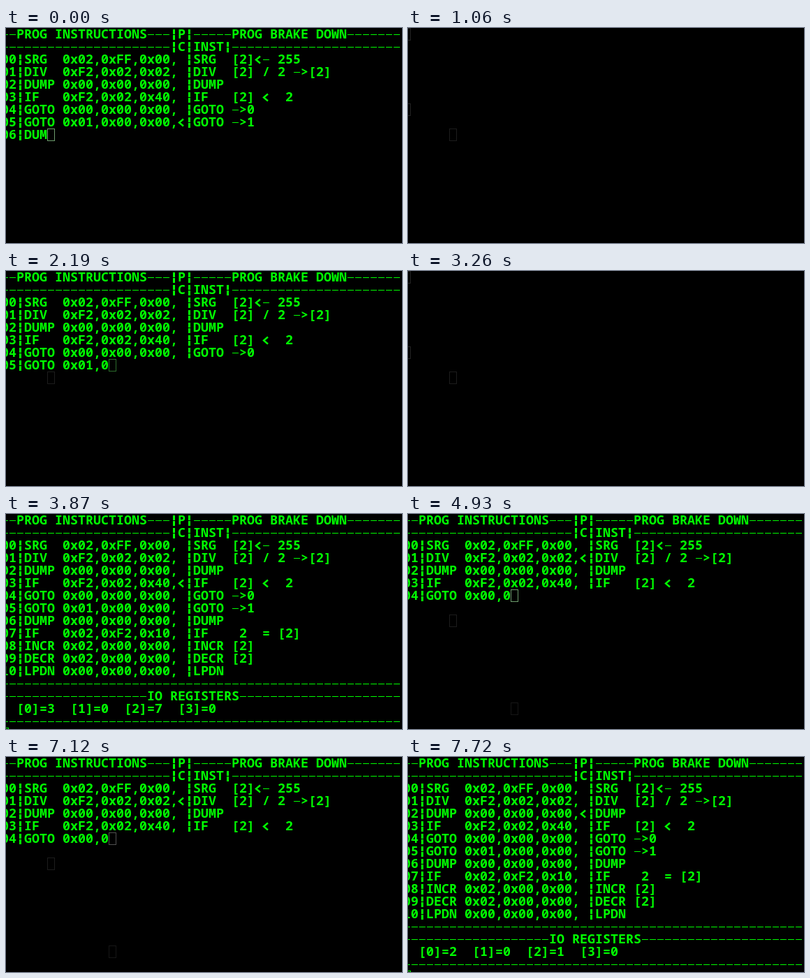
Recreate the animation shown at these times as an HTML page with a canvas. Size 567x308 px, loop 8000 ms.

```html
<!DOCTYPE html>
<html lang="en">
<head>
<meta charset="utf-8">
<title>Register machine</title>
<style>
  html, body { margin: 0; width: 100%; height: 100%; overflow: hidden; background: #000; }
  canvas { display: block; }
</style>
</head>
<body>
<canvas id="screen" width="567" height="308"></canvas>
<script>
const ctx = document.getElementById('screen').getContext('2d');
const LOOP = 8000, CELL_W = 11, CELL_H = 18, LEFT = -7, GREEN = '#00ff00';
const END = 17;

const program = [
  ['SRG', '0x02,0xFF,0x00', '[2]<- 255'],
  ['DIV', '0xF2,0x02,0x02', '[2] / 2 ->[2]'],
  ['DUMP', '0x00,0x00,0x00', ''],
  ['IF', '0xF2,0x02,0x40', '[2] <  2'],
  ['GOTO', '0x00,0x00,0x00', '->0'],
  ['GOTO', '0x01,0x00,0x00', '->1'],
  ['DUMP', '0x00,0x00,0x00', ''],
  ['IF', '0x02,0xF2,0x10', ' 2  = [2]'],
  ['INCR', '0x02,0x00,0x00', '[2]'],
  ['DECR', '0x02,0x00,0x00', '[2]'],
  ['LPDN', '0x00,0x00,0x00', '']
];

// time, program counter, register 2, output stops at row and column, cursor colour
const steps = [
  [0, 5, 31, 8, 6, '#6c9c6c'],
  [70, 5, 31, END],
  [530, 5, 31, 6, 0, '#505050'],
  [600, 5, 31, END],
  [1060, 2, 15, 0, 0],
  [1130, 2, 15, END],
  [1590, 3, 15, 0, 0],
  [1660, 3, 15, END],
  [2190, 5, 15, 7, 14, '#2c6c2c'],
  [2260, 5, 15, END],
  [2730, 5, 15, 7, 0],
  [2810, 5, 15, END],
  [3260, 2, 7, 0, 0],
  [3330, 2, 7, 15, 14, '#505050'],
  [3390, 2, 7, END],
  [3800, 3, 7, 0, 0],
  [3870, 3, 7, END],
  [4400, 5, 7, END],
  [4930, 1, 7, 6, 14, '#6c9c6c'],
  [5000, 1, 7, END],
  [5460, 2, 3, 5, 31, '#505050'],
  [5530, 2, 3, END],
  [5990, 3, 3, 0, 0],
  [6060, 3, 3, END],
  [6590, 5, 3, 7, 14, '#505050'],
  [6660, 5, 3, END],
  [7120, 1, 3, 6, 14, '#505050'],
  [7190, 1, 3, END],
  [7650, 2, 1, 0, 0],
  [7720, 2, 1, END]
];

// faint cursor traces: since, row, column, colour
const traces = [
  [70, 8, 6, '#1c1c1c'],
  [600, 6, 0, '#222222'],
  [1060, 0, 0, '#222222'],
  [3390, 15, 14, '#161616'],
  [5000, 6, 14, '#484848'],
  [5530, 5, 31, '#161616']
];

const dashes = n => '-'.repeat(n);
const cellX = col => LEFT + col * CELL_W;

function screenLines(pc, value) {
  const listing = program.map(([op, args, note], i) =>
    `${String(i).padStart(2, '0')}|${op.padEnd(5)}${args},${i === pc ? '<' : ' '}|${op.padEnd(5)}${note}`);
  return [
    `${dashes(2)}PROG INSTRUCTIONS${dashes(3)}|P|${dashes(5)}PROG BRAKE DOWN${dashes(7)}`,
    `${dashes(22)}|C|INST|${dashes(22)}`,
    ...listing,
    dashes(52),
    `${dashes(19)}IO REGISTERS${dashes(21)}`,
    `  [0]=${pc}  [1]=0  [2]=${value}  [3]=0`,
    dashes(52)
  ];
}

function drawArrow(x, y, color, width) {
  ctx.strokeStyle = color;
  ctx.lineWidth = width;
  ctx.beginPath();
  ctx.moveTo(x + 8, y + 4.5);
  ctx.lineTo(x + 2, y + 9.5);
  ctx.lineTo(x + 8, y + 14.5);
  ctx.stroke();
}

function drawChar(char, x, y) {
  if (char === '-') {
    ctx.fillRect(x + 1, y + 9, 9, 1);
  } else if (char === '|') {
    ctx.fillRect(x + 4, y + 2, 3, 7);
    ctx.fillRect(x + 4, y + 10, 3, 7);
  } else if (char === '<') {
    drawArrow(x, y, GREEN, 2.4);
  } else {
    ctx.fillText(char, x, y + 15);
  }
}

// printed cells are opaque, so they cover the traces
function drawLine(line, row) {
  const y = row * CELL_H;
  ctx.fillStyle = '#000';
  ctx.fillRect(LEFT, y, line.length * CELL_W, CELL_H);
  ctx.fillStyle = GREEN;
  [...line].forEach((char, col) => drawChar(char, cellX(col), y));
}

function drawCursor(row, col, color) {
  ctx.strokeStyle = color;
  ctx.lineWidth = 1;
  ctx.strokeRect(cellX(col) + 0.5, row * CELL_H + 0.5, CELL_W - 1, CELL_H - 1);
}

function draw(time) {
  const [, pc, value, endRow, endCol, cursor] = steps.findLast(step => step[0] <= time);
  ctx.fillStyle = '#000';
  ctx.fillRect(0, 0, 567, 308);
  for (const [since, row, col, color] of traces) {
    if (time >= since) drawCursor(row, col, color);
  }
  if (time >= 4400) drawArrow(cellX(23), 5 * CELL_H, '#1c1c1c', 1);

  ctx.font = 'bold 18.3px "Noto Sans Mono", monospace';
  screenLines(pc, value).forEach((line, row) => {
    if (row < endRow) drawLine(line, row);
    if (row === endRow) drawLine(line.slice(0, endCol), row);
  });
  if (endRow === END) drawCursor(END, 0, GREEN);
  if (cursor) drawCursor(endRow, endCol, cursor);
}

function tick() {
  draw(performance.now() % LOOP);
  requestAnimationFrame(tick);
}
tick();
</script>
</body>
</html>
```
